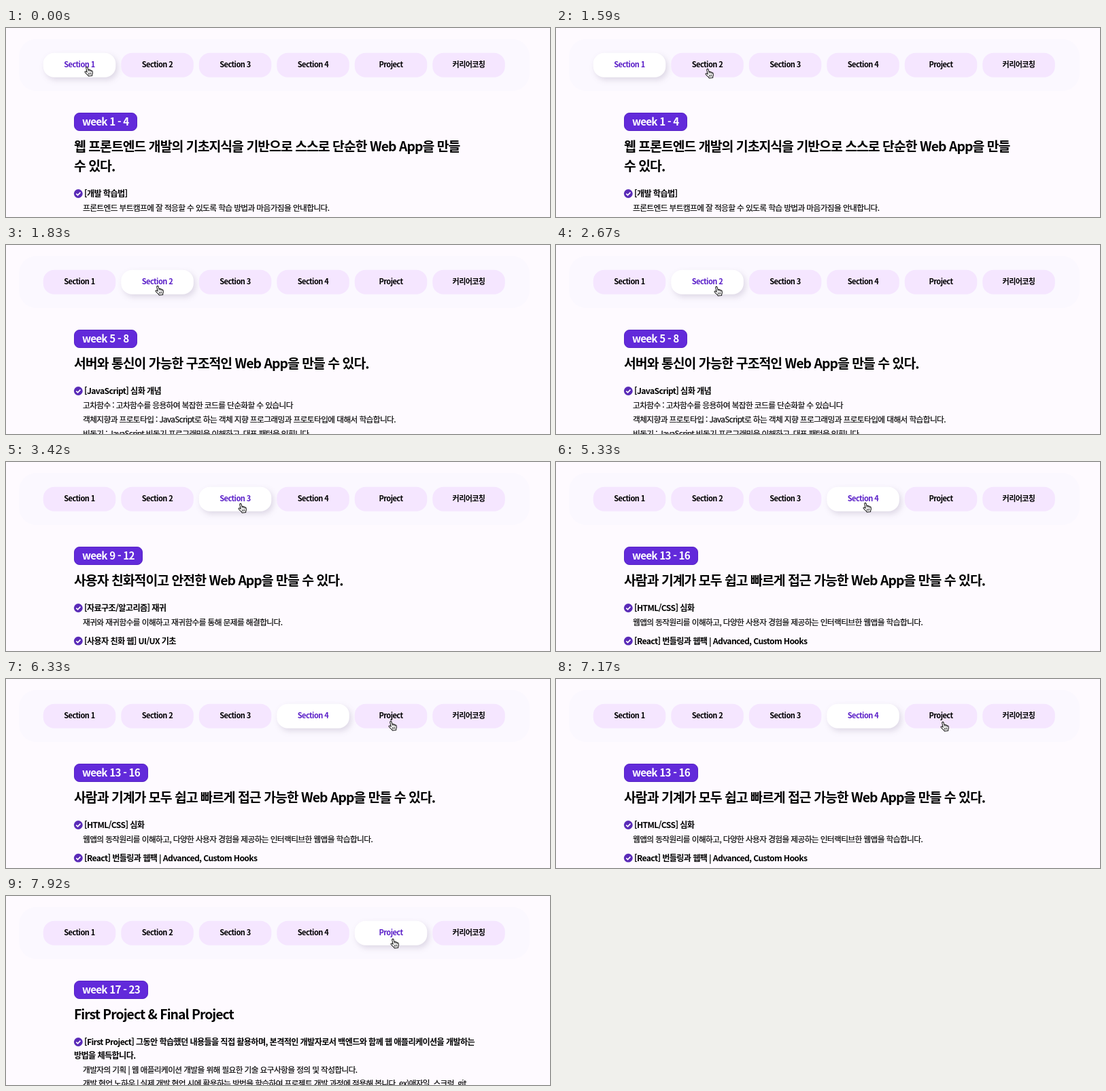
These frames come from a looping animation (800 px wide and 279 px high, 8 s). An HTML page:

```html
<!DOCTYPE html>
<html lang="ko">
<head>
<meta charset="utf-8">
<style>
  html, body { margin: 0; width: 100%; height: 100%; overflow: hidden; background: #fefaff; }
  svg { display: block; width: 100vw; height: 100vh; }
  text { font-family: "Noto Sans CJK KR", "Noto Sans CJK", "Noto Sans CJK JP", sans-serif; letter-spacing: -.05em; }
  .tab rect { fill: #f5e6ff; }
  .tab text { font-size: 11px; font-weight: 700; text-anchor: middle; }
  .tab.on rect { fill: #fff; filter: drop-shadow(3px 4px 4px rgba(60, 40, 90, .15)); }
  .tab.on text { fill: #5a1fc8; }
  .badge { font-size: 15.2px; font-weight: 700; fill: #fff; }
  .head { font-size: 19.35px; font-weight: 700; }
  .item { font-size: 12.13px; font-weight: 700; }
  .note { font-size: 11.7px; stroke: #000; stroke-width: .2px; }
</style>
</head>
<body>
<svg viewBox="0 0 800 279">
  <rect x="19" y="16" width="751" height="77" rx="26" fill="#fbf8ff"/>
  <g id="tabs"></g>
  <g id="pages"></g>
  <g id="hand" stroke="#111" stroke-width="1.1" stroke-linejoin="round" stroke-linecap="round">
    <path fill="#fff" d="M-1.4 1.3C-1.6-.3.6-.7 1.1.9L2.2 4.7C3.2 4 4.3 4.3 4.6 5.1 5.6 4.6 6.5 5 6.8 5.9 8 5.6 8.6 6.2 8.8 7.2 9.3 9.5 9 11 8.2 12.4V14L2.4 14.6 1.8 13.2C.2 12.1-1.4 10.5-3 8.6-3.8 7.4-2.4 6.4-1.3 7.2L.2 8.4Z"/>
    <path fill="none" stroke-width=".8" d="M2.2 4.7 2.7 6.8M4.6 5.1 5 7M6.8 5.9 7 7.4M2.5 9.6 2.9 12M4.4 9.4 4.7 11.8M6.3 9.2 6.5 11.6"/>
  </g>
</svg>
<script>
const LOOP = 8000, STEP = 1000 / 12;
const byId = id => document.getElementById(id);
const tabNames = ['Section 1', 'Section 2', 'Section 3', 'Section 4', 'Project', '커리어코칭'];

// Body lines: '*' starts a checked item, '-' a note, '+' a wrapped item line.
const pages = [
  { start: 0, week: '1 - 4', badge: 93,
    head: ['웹 프론트엔드 개발의 기초지식을 기반으로 스스로 단순한 Web App을 만들', '수 있다.'],
    body: ['*[개발 학습법]', '-프론트엔드 부트캠프에 잘 적응할 수 있도록 학습 방법과 마음가짐을 안내합니다.'] },
  { start: 1750, week: '5 - 8', badge: 93,
    head: ['서버와 통신이 가능한 구조적인 Web App을 만들 수 있다.'],
    body: ['*[JavaScript] 심화 개념', '-고차함수 : 고차함수를 응용하여 복잡한 코드를 단순화할 수 있습니다',
      '-객체지향과 프로토타입 : JavaScript로 하는 객체 지향 프로그래밍과 프로토타입에 대해서 학습합니다.',
      '-비동기 : JavaScript 비동기 프로그래밍을 이해하고, 대표 패턴을 익힙니다.'] },
  { start: 3333, week: '9 - 12', badge: 101,
    head: ['사용자 친화적이고 안전한 Web App을 만들 수 있다.'],
    body: ['*[자료구조/알고리즘] 재귀', '-재귀와 재귀함수를 이해하고 재귀함수를 통해 문제를 해결합니다.',
      '*[사용자 친화 웹] UI/UX 기초'] },
  { start: 4917, week: '13 - 16', badge: 109,
    head: ['사람과 기계가 모두 쉽고 빠르게 접근 가능한 Web App을 만들 수 있다.'],
    body: ['*[HTML/CSS] 심화', '-웹앱의 동작원리를 이해하고, 다양한 사용자 경험을 제공하는 인터랙티브한 웹앱을 학습합니다.',
      '*[React] 번들링과 웹팩 | Advanced, Custom Hooks'] },
  { start: 7250, week: '17 - 23', badge: 109,
    head: ['First Project &amp; Final Project'],
    body: ['*[First Project] 그동안 학습했던 내용들을 직접 활용하며, 본격적인 개발자로서 백엔드와 함께 웹 애플리케이션을 개발하는',
      '+방법을 체득합니다.', '-개발자의 기획 | 웹 애플리케이션 개발을 위해 필요한 기술 요구사항을 정의 및 작성합니다.',
      '-개발 협업 노하우 | 실제 개발 협업 시에 활용하는 방법을 학습하여 프로젝트 개발 과정에 적용해 봅니다. ex)애자일, 스크럼, git'] }
];

// Pointer tip: [time, x, y]
const route = [[0, 119, 57.5], [580, 119, 57.5], [1450, 223, 60.5], [2000, 223, 60.5], [2600, 236, 61.5], [2750, 236, 61.5],
  [3200, 345, 61.5], [3800, 345, 61.5], [4250, 378, 61.5], [4420, 378, 61.5], [4800, 455, 60.5], [5500, 455, 60.5],
  [6250, 566, 62.5], [6400, 566, 62.5], [6800, 569, 63.5], [LOOP, 569, 63.5]];

const label = (cls, x, y, s) => `<text class="${cls}" x="${x}" y="${y}">${s}</text>`;
const check = y => `<circle cx="106.3" cy="${y}" r="6.4" fill="#5a2bb8"/>
  <path d="M103.3 ${y + .2}l2.2 2.2 4-4.3" fill="none" stroke="#fff" stroke-width="1.7"/>`;

function pageMarkup({ week, badge, head, body }) {
  let out = `<rect x="100.5" y="125.5" width="${badge - 1}" height="26" rx="7.5" fill="#622ada" stroke="#5823c6"/>`;
  out += label('badge', 112, 144.3, 'week ' + week);
  head.forEach((s, i) => out += label('head', 100, 182.2 + 29 * i, s));
  let y = 215.5 + 29 * (head.length - 1), last = '';
  for (const line of body) {
    const kind = line[0], s = line.slice(1);
    if (last) y += kind == '*' ? 27 : kind == '+' ? 20 : last == '*' ? 21.7 : 20.8;
    if (kind == '*') out += check(y);
    out += kind == '-' ? label('note', 113, y + 4.2, s) : label('item', kind == '*' ? 115 : 100, y + 4.4, s);
    last = kind;
  }
  return `<g>${out}</g>`;
}

byId('tabs').innerHTML = tabNames.map((s, i) => {
  const x = 54.8 + 114.5 * i;
  return `<g class="tab"><rect x="${x}" y="36.7" width="106.5" height="36" rx="16"/>${label('', x + 53.2, 58.1, s)}</g>`;
}).join('');
byId('pages').innerHTML = pages.map(pageMarkup).join('');

const tabEls = [...byId('tabs').children], pageEls = [...byId('pages').children];

function pointerAt(t) {
  const i = Math.max(1, route.findIndex(p => p[0] >= t));
  const [t0, x0, y0] = route[i - 1], [t1, x1, y1] = route[i];
  const u = (t - t0) / (t1 - t0), e = u * u * (3 - 2 * u);
  return [x0 + (x1 - x0) * e, y0 + (y1 - y0) * e];
}

function draw(now) {
  const t = Math.floor((now % LOOP + 4) / STEP) * STEP % LOOP;
  const active = pages.filter(p => p.start <= t + 1).length - 1;
  tabEls.forEach((el, i) => el.classList.toggle('on', i == active));
  pageEls.forEach((el, i) => el.style.display = i == active ? '' : 'none');
  byId('hand').setAttribute('transform', `translate(${pointerAt(t)}) scale(.93)`);
}

const begin = performance.now();
function tick() {
  draw(performance.now() - begin);
  requestAnimationFrame(tick);
}
tick();
</script>
</body>
</html>
```
